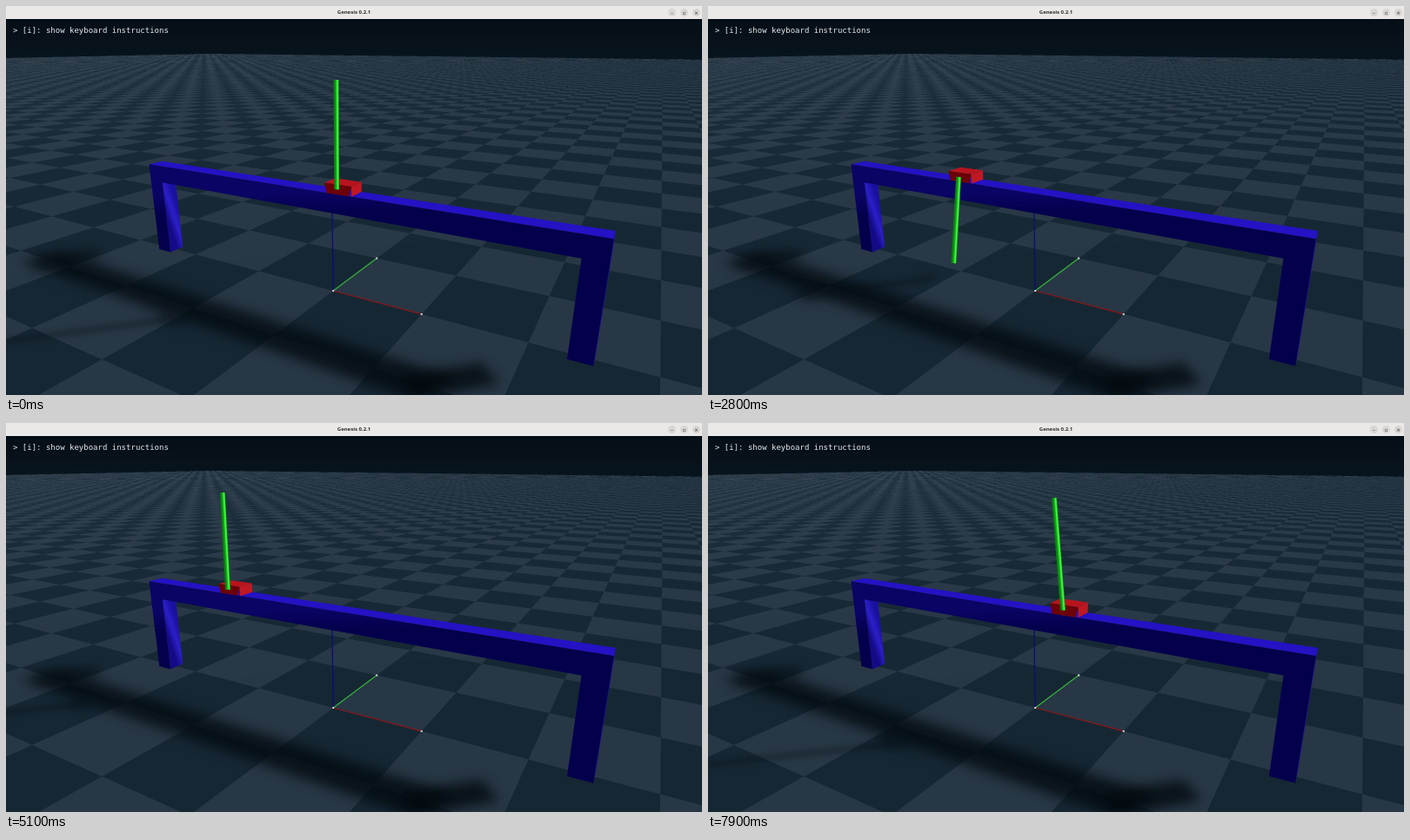
Write an HTML page with a canvas that moves like this. It is 800 px wide and 448 px high and loops after 8000 ms.

```html
<!DOCTYPE html>
<html lang="en">
<head>
<meta charset="utf-8">
<title>Genesis 0.2.1</title>
<style>
  html, body { margin: 0; width: 100%; height: 100%; overflow: hidden; background: #07121b; }
  #stage { position: relative; width: 800px; height: 448px; overflow: hidden; }
  canvas { position: absolute; left: 0; top: 0; }
  .bar { position: absolute; left: 0; top: 0; width: 800px; height: 15px; background: #ebe9e7; }
  .title { position: absolute; width: 800px; text-align: center; color: #2c2c2c;
    font: bold 6px/15px "Open Sans", "Noto Sans", sans-serif; }
  .btn { position: absolute; top: 3px; width: 9px; height: 9px; border-radius: 50%; background: #d8d5d2;
    color: #333; text-align: center; font: 6px/9px "DejaVu Sans", sans-serif; }
  .hint { position: absolute; left: 8px; top: 22px; color: #e6ebee; white-space: pre;
    font: 9px/12px "DejaVu Sans Mono", monospace; }
</style>
</head>
<body>
<div id="stage">
  <canvas id="view" width="800" height="448"></canvas>
  <div class="bar">
    <div class="title">Genesis 0.2.1</div>
    <div class="btn" style="left:761px">–</div>
    <div class="btn" style="left:775px">▫</div>
    <div class="btn" style="left:789px">×</div>
  </div>
  <div class="hint">&gt; [i]: show keyboard instructions</div>
</div>
<script>
const W = 800, H = 448, LOOP = 8000, STEP = 100;
const ctx = document.getElementById('view').getContext('2d');

// Camera
const FOCAL = 595, CX = 400, CY = 231.5;
const cam = { x: 2.63, y: -4.18, z: 2.482 };
const yaw = 29.64 * Math.PI / 180, pitch = 17.49 * Math.PI / 180;
const sy = Math.sin(yaw), cy = Math.cos(yaw), sp = Math.sin(pitch), cp = Math.cos(pitch);

function project([x, y, z]) {
  const dx = x - cam.x, dy = y - cam.y, dz = z - cam.z;
  const ahead = -sy * dx + cy * dy, right = cy * dx + sy * dy;
  const depth = cp * ahead - sp * dz, down = -sp * ahead - cp * dz;
  return [CX + FOCAL * right / depth, CY + FOCAL * down / depth];
}

// Floor and sky, rendered once
const FLOOR = 104, SUB = 3;
const mix = (a, b, k) => a + (b - a) * k;

function floorColor(px, py) {
  const u = (px - CX) / FOCAL, v = (py - CY) / FOCAL;
  const fall = sp + v * cp;
  const sky = Math.min(1, Math.max(0, (py - 15) / 45));
  const dark = [mix(4, 8, sky), mix(14, 20, sky), mix(22, 29, sky)];
  if (fall <= 0) return dark;
  const t = cam.z / fall, ahead = cp - v * sp;
  const x = cam.x + t * (u * cy - ahead * sy), y = cam.y + t * (u * sy + ahead * cy);
  if (Math.abs(x) > FLOOR || Math.abs(y) > FLOOR) return dark;
  const lit = (Math.floor(x) + Math.floor(y)) & 1 ? 0 : 1;
  const glow = Math.exp(-(py - 55) / 75) * mix(1, 0.35, px / W) * 15;
  return lit ? [40 + glow, 55 + glow, 69 + glow] : [22 + glow, 39 + glow, 52 + glow];
}

function renderBackdrop() {
  const c = document.createElement('canvas');
  c.width = W; c.height = H;
  const g = c.getContext('2d'), img = g.createImageData(W, H);
  for (let y = 0; y < H; y++) for (let x = 0; x < W; x++) {
    const sum = [0, 0, 0], i = (y * W + x) * 4;
    for (let s = 0; s < SUB * SUB; s++) {
      const rgb = floorColor(x + (s % SUB + 0.5) / SUB, y + ((s / SUB | 0) + 0.5) / SUB);
      for (let k = 0; k < 3; k++) sum[k] += rgb[k];
    }
    for (let k = 0; k < 3; k++) img.data[i + k] = sum[k] / (SUB * SUB);
    img.data[i + 3] = 255;
  }
  g.putImageData(img, 0, 0);
  return c;
}
const backdrop = renderBackdrop();

// Drawing helpers
function poly(points, fill) {
  ctx.beginPath();
  points.forEach(p => ctx.lineTo(...project(p)));
  ctx.closePath();
  ctx.fillStyle = fill;
  ctx.fill();
}
function line(a, b, color, width, shift = 0) {
  const [x1, y1] = project(a), [x2, y2] = project(b);
  ctx.beginPath();
  ctx.moveTo(x1 + shift, y1);
  ctx.lineTo(x2 + shift, y2);
  ctx.strokeStyle = color;
  ctx.lineWidth = width;
  ctx.stroke();
}
function dot(p) {
  const [x, y] = project(p);
  ctx.fillStyle = '#cfd6d8';
  ctx.fillRect(x - 1, y - 1, 2, 2);
}
function ramp(a, b, ...colors) {
  const g = ctx.createLinearGradient(...project(a), ...project(b));
  colors.forEach((c, i) => g.addColorStop(i / (colors.length - 1), c));
  return g;
}

// Robot dimensions in metres
const END = 2.53, LEG = 0.2, HALF = 0.1, TOP = 1.1, UNDER = 0.9, PIVOT = 1.157, POLE = 1.02;
const shade = (x, y, z) => [x - z, y - z, 0];

function drawShadow(cart, tip, lift) {
  const hi = TOP + lift, lo = UNDER + lift, leg = 0.6 + lift;
  ctx.save();
  ctx.filter = 'blur(7px)';
  const ink = 'rgba(3,10,16,.8)';
  poly([shade(-END, HALF, lo), shade(END, HALF, lo), shade(END, -HALF, hi), shade(-END, -HALF, hi)], ink);
  for (const x of [-END, END - LEG])
    poly([shade(x, HALF, leg), shade(x + LEG, -HALF, leg), shade(x + LEG, -HALF, hi), shade(x, HALF, hi)], ink);
  poly([shade(cart - 0.15, -HALF, hi), shade(cart + 0.15, -HALF, hi),
    shade(cart + 0.15, -HALF, hi + 0.1), shade(cart - 0.15, -HALF, hi + 0.1)], ink);
  ctx.filter = 'blur(3px)';
  line(shade(cart, -0.12, PIVOT + lift), shade(...tip), 'rgba(3,10,16,.35)', 6);
  ctx.restore();
}

function drawAxes() {
  line([0, 0, 0], [0, 0, 1], '#0c0c78', 1.3);
  line([0, 0, 0], [1, 0, 0], '#8c1518', 1.2);
  line([0, 0, 0], [0, 1, 0], '#35b53a', 1.2);
  [[0, 0, 0], [1, 0, 0], [0, 1, 0]].forEach(dot);
}

function drawFrame(z) {
  const hi = TOP + z, lo = UNDER + z, inner = END - LEG;
  poly([[-inner, -HALF, z], [-inner, HALF, z], [-inner, HALF, lo], [-inner, -HALF, lo]],
    ramp([-inner, -HALF, 0.5], [-inner, HALF, 0.5], '#140a86', '#2c1fc8', '#1a10a0'));
  poly([[END, -HALF, z], [END, HALF, z], [END, HALF, hi], [END, -HALF, hi]], '#2016a8');
  poly([[-END, -HALF, hi], [END, -HALF, hi], [END, HALF, hi], [-END, HALF, hi]], '#2412c4');
  poly([[-END, -HALF, z], [-inner, -HALF, z], [-inner, -HALF, lo], [inner, -HALF, lo],
    [inner, -HALF, z], [END, -HALF, z], [END, -HALF, hi], [-END, -HALF, hi]],
    ramp([0, -HALF, hi], [0, -HALF, lo], '#0a0464', '#04004c'));
}

function drawCart(x, z) {
  const l = x - 0.15, r = x + 0.15, lo = TOP + z, hi = lo + 0.1;
  poly([[l, -HALF, hi], [r, -HALF, hi], [r, HALF, hi], [l, HALF, hi]], '#b8141e');
  poly([[r, -HALF, lo], [r, HALF, lo], [r, HALF, hi], [r, -HALF, hi]], '#c01822');
  poly([[l + 0.02, -HALF, lo], [r - 0.03, -HALF, lo], [r, -HALF, hi], [l, -HALF, hi]], '#6c0209');
}

function drawPole(base, tip) {
  line(base, tip, '#0a8212', 6);
  line(base, tip, '#17b81c', 3.5, 0.8);
  line(base, tip, '#46f545', 1.6, 1.3);
}

// Motion: [time, value] keys joined by smooth curves
const cartKeys = [[2400, -0.188], [2800, -0.85], [3300, -1.78], [3600, -1.9], [4000, -1.62],
  [4500, -1.5], [5100, -1.247], [6100, -0.677], [7900, 0.395], [8000, 0.43]];
const poleKeys = [[2400, 18], [2800, -8], [3300, 43], [3600, 0], [3900, -95], [4250, -168],
  [4600, -182], [5100, -181.5], [6100, -181.7], [7000, -179.5], [7900, -174.8], [8000, -174.5]];

function curve(keys, t) {
  const slope = i => {
    const a = keys[Math.max(0, i - 1)], b = keys[Math.min(keys.length - 1, i + 1)];
    return (b[1] - a[1]) / (b[0] - a[0]);
  };
  let i = 0;
  while (i < keys.length - 2 && t >= keys[i + 1][0]) i++;
  const [t0, a] = keys[i], [t1, b] = keys[i + 1], d = t1 - t0, k = (t - t0) / d;
  const k2 = k * k, k3 = k2 * k;
  return a * (2 * k3 - 3 * k2 + 1) + b * (3 * k2 - 2 * k3) +
    d * (slope(i) * (k3 - 2 * k2 + k) + slope(i + 1) * (k3 - k2));
}

function pose(t) {
  if (t < 2400) return { cart: 0.13, angle: -180.4, lift: 0 };
  const fall = (t - 2400) / 1000;
  return { cart: curve(cartKeys, t), angle: curve(poleKeys, t), lift: Math.max(0, 0.095 - 4.9 * fall * fall) };
}

function draw(t) {
  const { cart, angle, lift } = pose(t);
  const a = angle * Math.PI / 180;
  const base = [cart, -0.12, PIVOT + lift];
  const tip = [cart + POLE * Math.sin(a), -0.12, base[2] - POLE * Math.cos(a)];
  ctx.drawImage(backdrop, 0, 0);
  drawShadow(cart, tip, lift);
  drawAxes();
  drawFrame(lift);
  drawCart(cart, lift);
  drawPole(base, tip);
}

let shown = -1;
const start = performance.now();
function tick() {
  const t = Math.floor((performance.now() - start) % LOOP / STEP) * STEP;
  if (t !== shown) draw(shown = t);
  requestAnimationFrame(tick);
}
tick();
</script>
</body>
</html>
```
